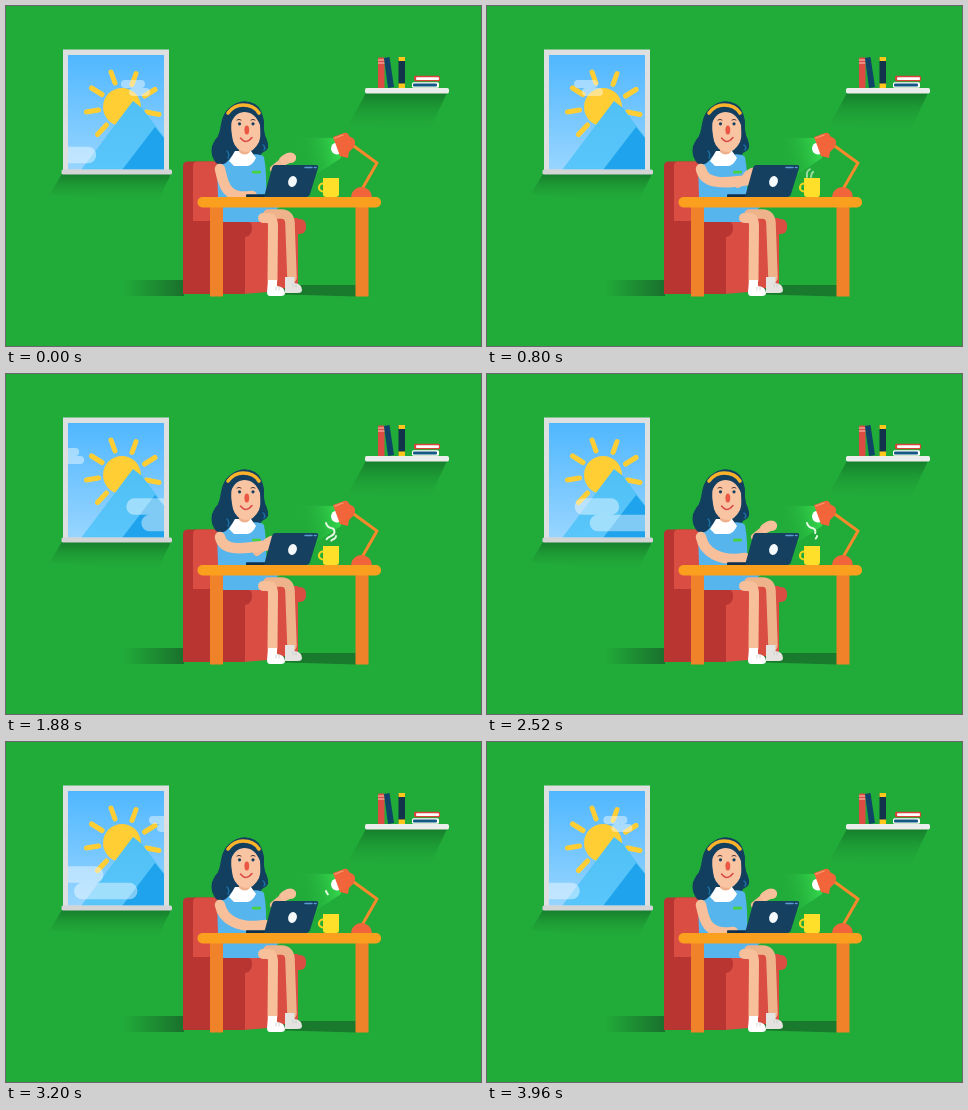
An HTML page that plays this animation: 475 by 340 pixels, repeating every 4 s.

```html
<!DOCTYPE html>
<html lang="en">
<head>
<meta charset="utf-8">
<title>At the desk</title>
<style>
  html, body { margin: 0; width: 100%; height: 100%; overflow: hidden; background: #21ab39; }
  svg { display: block; width: 100vw; height: 100vh; }
  .line { fill: none; stroke-linecap: round; stroke-linejoin: round; }
</style>
</head>
<body>
<svg viewBox="0 0 475 340">
  <defs>
    <linearGradient id="sky" x2="0" y2="1">
      <stop stop-color="#50b7ff"/><stop offset="1" stop-color="#98d5ff"/>
    </linearGradient>
    <linearGradient id="hill" x2="0" y2="1">
      <stop stop-color="#4fc0f5"/><stop offset="1" stop-color="#5ac6fb"/>
    </linearGradient>
    <linearGradient id="drop" x2="0" y2="1">
      <stop stop-color="#14752a" stop-opacity=".85"/><stop offset="1" stop-color="#21ab39" stop-opacity="0"/>
    </linearGradient>
    <linearGradient id="floor">
      <stop stop-color="#19702c" stop-opacity="0"/><stop offset="1" stop-color="#19702c"/>
    </linearGradient>
    <linearGradient id="glow" gradientUnits="userSpaceOnUse" x1="332" y1="142" x2="293" y2="150">
      <stop stop-color="#35d64d"/><stop offset="1" stop-color="#21ab39" stop-opacity="0"/>
    </linearGradient>
    <clipPath id="pane"><path d="M62 49H158V163.500H62Z"/></clipPath>
  </defs>

  <rect width="475" height="340" fill="#21ab39"/>

  <!-- window -->
  <path d="M56 168H165L150 198L44 188Z" fill="url(#drop)"/>
  <rect x="57" y="43.500" width="106" height="122" fill="#dedfe1"/>
  <g clip-path="url(#pane)">
    <rect x="62" y="49" width="96" height="115" fill="url(#sky)"/>
    <circle cx="116" cy="101" r="19" fill="#ffcd34"/>
    <path class="line" stroke="#ffcd34" stroke-width="5"
      d="M105 66L109 77M130 67.500L126 78.500M149 83.500L138.500 90M153 108.500L140.500 106M85.500 82L96 88.500M80.500 106L92.500 104M91.500 128.500L100.500 119"/>
    <path d="M75 164L127 95L136 102L158 131V164Z" fill="url(#hill)"/>
    <path d="M116 164L149 121L158 132V164Z" fill="#1ea3ec"/>
    <g id="small" fill="#fff" opacity=".43">
      <path d="M4 0H20A4 4 0 0 1 20 8H25A4 4 0 0 1 25 16H12A4 4 0 0 1 12 8H4A4 4 0 0 1 4 0Z"/>
    </g>
    <g id="large" fill="#fff" opacity=".43">
      <path d="M8 0H36A8 8 0 0 1 36 16.500H70A8 8 0 0 1 70 33H23A8 8 0 0 1 23 16.500H8A8 8 0 0 1 8 0Z"/>
    </g>
  </g>
  <rect x="55.500" y="163.500" width="110.500" height="5" rx="1.500" fill="#d2d4d5"/>

  <!-- shelf -->
  <path d="M360 87H441L422 127L343 118Z" fill="url(#drop)"/>
  <rect x="359" y="82" width="84" height="5.500" rx="1.800" fill="#eceeee"/>
  <rect x="372" y="51.500" width="6.500" height="30.500" rx=".8" fill="#dc4c45"/>
  <path d="M372 54H378.500M372 57H378.500" stroke="#f7c8bd" stroke-width="1.200"/>
  <path d="M378 52L383.500 51L388 81L382 82Z" fill="#0f4468"/>
  <rect x="392.500" y="51" width="6.500" height="31" rx=".8" fill="#12334c"/>
  <path d="M392.500 51H399V55H392.500ZM392.500 77.500H399V82H392.500Z" fill="#ffc61c"/>
  <rect x="408" y="69.800" width="26" height="5.500" rx="1.500" fill="#d9433c"/>
  <rect x="410" y="71.200" width="23" height="2.800" rx="1" fill="#fff"/>
  <rect x="406" y="76.200" width="27" height="5.500" rx="1.500" fill="#fff"/>
  <rect x="407" y="77.600" width="24" height="2.800" rx="1" fill="#145784"/>

  <!-- floor shadows and chair -->
  <rect x="118" y="274" width="60" height="16" fill="url(#floor)"/>
  <path d="M262 279H350V290.500L262 288Z" fill="#197a2e"/>
  <rect x="274" y="213" width="26" height="15" rx="6" fill="#d94d42"/>
  <path d="M237 212H292V279L262 286L237 288Z" fill="#da4d43"/>
  <path d="M177 160Q177 155.500 182 155.500H214V216H177Z" fill="#b93532"/>
  <path d="M187 160Q187 155.500 191 155.500H214V216H187Z" fill="#d94d43"/>
  <path d="M177 160H187V215H240Q247 216 246 223Q245 230 239 231V288H177Z" fill="#b93532"/>

  <!-- legs -->
  <path d="M217 200H274L258 216H217Z" fill="#55b5ec"/>
  <path class="line" d="M262 208H275Q284 208 284 218L286 272" stroke="#efb38c" stroke-width="9.500"/>
  <path class="line" d="M257 212H262Q267 212 267 220L266.500 274" stroke="#f7bf9a" stroke-width="10"/>
  <path d="M279 271H288.500V277Q296 278 296 284Q296 287 292 287H279Z" fill="#e4e3df"/>
  <path d="M262 274H271V280Q279 281 279 287Q279 290 275 290H264Q261 290 261 286Z" fill="#fff"/>
  <path class="line" d="M270 281V284M273 281V284M287 278V281M290 278V281" stroke="#c9cccb" stroke-width=".8"/>

  <!-- woman -->
  <path d="M227 99Q238 92 249 98Q256 102 258 116Q257 127 261 134Q264 144 256 147L250 158H223Q211 161 207 150Q204 142 209 134Q215 128 216 116Q218 104 227 99Z" fill="#123f60"/>
  <path d="M211 159Q224 148 236 150Q254 146 258 151Q261 167 260 191H212Z" fill="#55b5ec"/>
  <path d="M229 145H245L250 152Q246 160 241 160H228L223 155Z" fill="#fff"/>
  <path d="M233 140H244V146Q239 151 233 146Z" fill="#efb18b"/>
  <path d="M226 111Q229 104 239 103Q251 104 254 112Q257 124 253 136Q248 146 240 146Q230 145 227 135Q224 123 226 111Z" fill="#f8c4a2"/>
  <path d="M226 101Q219 113 225 126Q228 141 225 151Q218 162 210 157Q204 150 206 140Q213 133 215 118Q217 105 226 101Z" fill="#123f60"/>
  <path d="M224 121Q227 107 238 106Q249 106 254 119Q254 132 256 145Q263 146 262 138Q257 129 258 117Q256 99 238 97Q222 99 222 117Z" fill="#123f60"/>
  <path class="line" d="M222 107Q228 99 237 99Q248 99 253 107" stroke="#f8b32b" stroke-width="3.600"/>
  <path class="line" d="M221 145Q224 148 222 152M257 139Q260 141 258 144" stroke="#1c6fa3" stroke-width="1.500"/>
  <path class="line" d="M231 114Q233 112.500 235 114M245 114Q247 112.500 249 114" stroke="#563d37" stroke-width="1"/>
  <circle cx="233.500" cy="117.800" r="1.600" fill="#173f5b"/>
  <circle cx="247" cy="117.800" r="1.600" fill="#173f5b"/>
  <ellipse cx="240.800" cy="124" rx="2.400" ry="4.500" fill="#ea5845"/>
  <path class="line" d="M234.500 132Q240 139 246 131.500" stroke="#d94a40" stroke-width="1.500"/>
  <rect x="246" y="164.800" width="9" height="2.700" rx="1.300" fill="#48d33e"/>

  <!-- lamp light -->
  <path d="M292 131.500L333 132L335 152L311 168L292 168Z" fill="url(#glow)"/>

  <!-- arms and laptop -->
  <g id="far">
    <path class="line" d="M268 163L279 154" stroke="#f3b992" stroke-width="8"/>
    <path d="M273 153Q278 147 284 146.500Q291 147 290 153Q289 157 284 157L277 160Z" fill="#f7bf9a"/>
  </g>
  <path id="near" class="line" stroke="#f7bf9a" stroke-width="10.500"/>
  <rect x="240" y="188.300" width="24" height="3" rx="1" fill="#0e304c"/>
  <path d="M269 159H310Q313 159 312 162L304 188Q303 191 300 191H258L266 162Q267 159 269 159Z" fill="#16405f"/>
  <path class="line" d="M299 161.500H306M308.500 161.500H310" stroke="#579bd0" stroke-width="1.500"/>
  <ellipse cx="286.500" cy="175.500" rx="4.300" ry="5.600" transform="rotate(18 286.500 175.500)" fill="#f5fafc"/>

  <!-- steam and mug -->
  <g class="line" stroke="#effbe9" stroke-width="2">
    <path id="wisp" pathLength="1" d="M320 171C319 164 322 164 325 162C331 159 328 154 325 154Q321 153 320 149"/>
    <path id="curl" pathLength="1" d="M324 171Q324 166 328 165Q330 164 330 162"/>
  </g>
  <circle cx="317" cy="181.500" r="4" fill="none" stroke="#f6d51f" stroke-width="2.200"/>
  <path d="M317 172H333V188Q333 191 330 191H320Q317 191 317 188Z" fill="#fee02b"/>

  <!-- lamp -->
  <circle cx="331" cy="142.500" r="6" fill="#fff"/>
  <path class="line" d="M355.500 184L371 157L345 138" stroke="#f48a2b" stroke-width="3"/>
  <path d="M327 131L338 127Q342 126 343 130L348 133Q350 136 348 141L343 146L342 152L334 150Z" fill="#f2653a"/>
  <path class="line" d="M329 132L337 129" stroke="#f79a76" stroke-width="1.300"/>
  <path d="M345 191A10.500 10 0 0 1 366 191Z" fill="#f2653a"/>

  <!-- desk -->
  <path d="M204 198H217V290.500H204ZM349.500 198H362.500V290.500H349.500Z" fill="#f08329"/>
  <rect x="191.500" y="191" width="183.500" height="10.500" rx="5" fill="#fba01e"/>
</svg>
<script>
  const LOOP = 4000;
  const $ = id => document.getElementById(id);
  const clamp = v => Math.min(1, Math.max(0, v));
  const mix = (a, b, k) => a + (b - a) * k;
  const ramp = (t, from, to) => clamp((t - from) / (to - from));

  // time, hand x, hand y, lift of the far hand
  const poses = [
    [0, 246, 190, 1], [800, 261, 174, 0], [1400, 258, 182, 1], [1880, 263, 171, 0],
    [2520, 258, 184, 1], [3200, 259, 183, 1], [LOOP, 246, 190, 1]
  ];

  function poseAt(t) {
    const i = poses.findIndex(p => p[0] > t);
    const a = poses[i - 1], b = poses[i];
    const k = (1 - Math.cos(Math.PI * ramp(t, a[0], b[0]))) / 2;
    return a.map((v, n) => mix(v, b[n], k));
  }

  const move = (id, x, y) => $(id).setAttribute("transform", `translate(${x} ${y})`);

  function trim(id, head, tail) {
    const path = $(id), len = head - tail;
    path.style.visibility = len > 0.005 ? "visible" : "hidden";
    path.setAttribute("stroke-dasharray", `${Math.max(len, 0)} 3`);
    path.setAttribute("stroke-dashoffset", -tail);
  }

  function draw(t) {
    const s = t / 1000;
    move("small", s < 2.2 ? 115 - 35 * s : 255 - 35 * s, 74);
    move("large", s < 1 ? 12 - 51 * s : 216.500 - 51 * s, 124.300);

    const [, x, y, lift] = poseAt(t);
    $("near").setAttribute("d", `M214 163C217 178 ${x - 26} ${y + 4} ${x} ${y}`);
    move("far", mix(-17, 0, lift), mix(15, 0, lift));

    trim("wisp", ramp(t, 500, 1500), ramp(t, 1500, 3450));
    trim("curl", ramp(t, 500, 1100), ramp(t, 1100, 3000));
    $("wisp").style.opacity = $("curl").style.opacity = mix(0.5, 0.95, ramp(t, 600, 1400));
  }

  function frame(now) {
    draw(now % LOOP);
    requestAnimationFrame(frame);
  }
  draw(0);
  requestAnimationFrame(frame);
</script>
</body>
</html>
```
